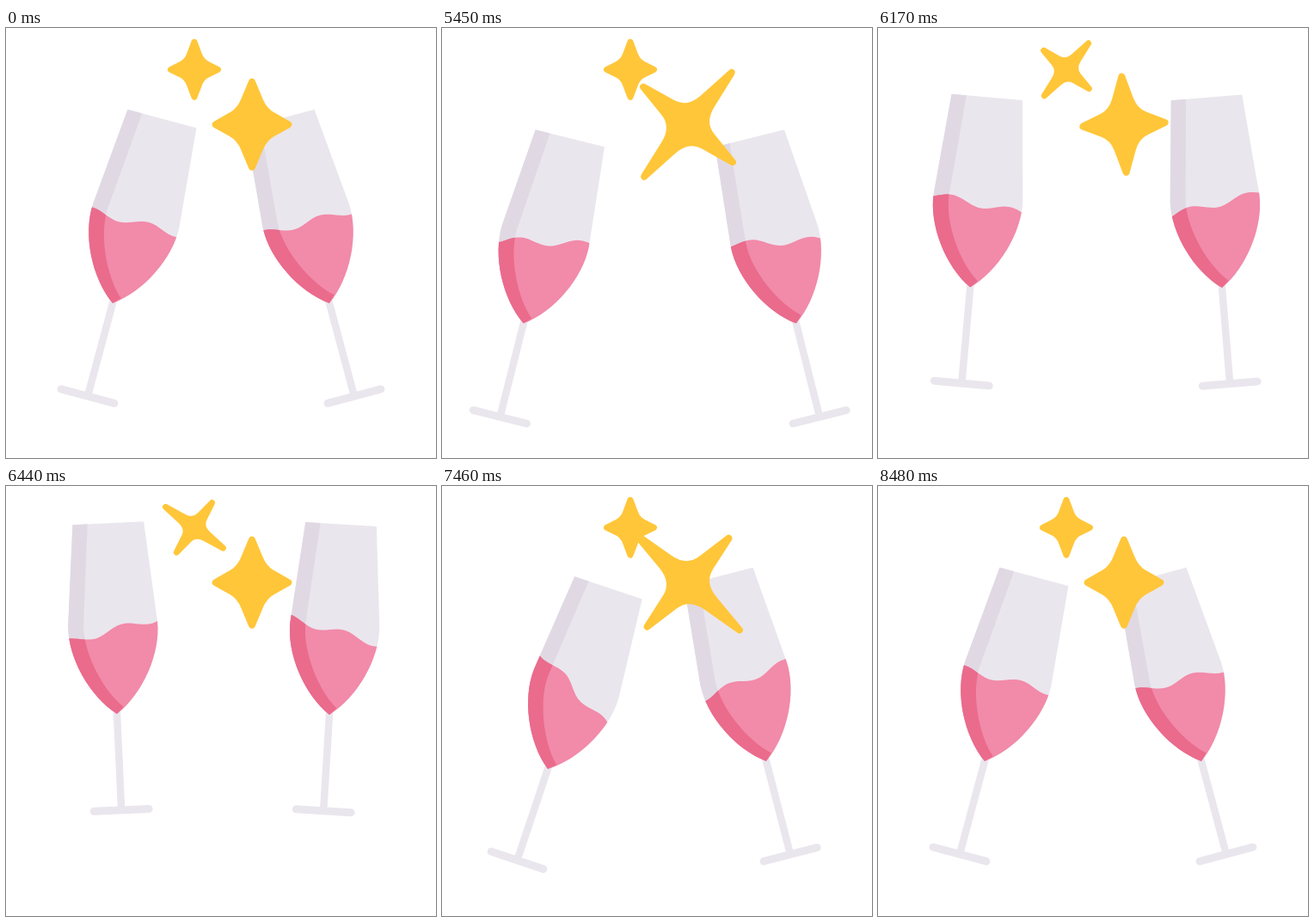
Write an HTML page that moves like this. It is 500 by 500 pixels and loops after 8510 ms.

```html
<!DOCTYPE html>
<html lang="en">
<head>
<meta charset="utf-8">
<title>Cheers</title>
<style>
  html, body { margin: 0; width: 100%; height: 100%; overflow: hidden; background: #fff; }
  svg { display: block; width: 100%; height: 100%; }
</style>
</head>
<body>
<svg viewBox="0 0 500 500">
  <defs>
    <path id="bowl" d="M-41.4-222L-52-105C-54-68-31-22 0 0C31-22 54-68 52-105L41.4-222Z"/>
    <path id="band" d="M-41.4-222L-52-105C-54-68-31-22 0 0L8-8C-14-27-36-72-34-105L-24-222Z"/>
    <clipPath id="inBowl"><use href="#bowl"/></clipPath>
    <clipPath id="inBand"><use href="#band"/></clipPath>
  </defs>
  <g id="glasses"></g>
  <g id="stars" fill="#ffc639" stroke="#ffc639" stroke-linejoin="round"></g>
</svg>
<script>
const LOOP = 8510, START = 5000, END = 8480, STEP = 30;
const WAVE = { length: 68, height: 4.2, crest: 16, cycles: 5, level: -97.5 };

// Rows: time, x, y, angle of the bowl's tip; slosh rows: time, tilt of the liquid.
const GLASSES = [
  {
    pose: [
      [5000, 124, 320, 15], [5820, 77.5, 357.5, 13], [5930, 82, 347, 12.5],
      [6440, 129, 265, -2.65], [6980, 109, 344, 4.2], [7240, 113, 344, 20.5],
      [7460, 123, 329, 18.5], [7660, 124, 320, 15]
    ],
    slosh: [
      [5000, 0], [5400, -12], [5930, 18], [6440, -12.5], [6980, -35],
      [7460, 30], [7800, -8], [8150, 4], [8480, 0]
    ]
  },
  {
    pose: [
      [5000, 376, 320, -15], [5820, 433, 357.5, -13], [5930, 428, 347, -12.5],
      [6440, 376, 266, 3.5], [6980, 388, 347, -12.5], [7060, 388.5, 348, -15.5],
      [7460, 377, 320, -14.5], [7660, 376, 320, -15]
    ],
    slosh: [
      [5000, 0], [5400, 12], [5930, -22], [6440, 13], [6940, 35], [6980, 34],
      [7460, -9], [7560, -12], [7900, 5], [8200, -2], [8480, 0]
    ]
  }
];

const STARS = [
  { x: 219, y: 48.3, tall: 35.5, wide: 31, inner: [8.5, 9.5], line: 7, grow: .29, pinch: .55, starts: [5770] },
  { x: 286, y: 112.2, tall: 53.5, wide: 46.3, inner: [14, 16], line: 8, grow: .72, pinch: .4, starts: [5050, 6760] }
];
const SPIN = 1300;

const fix = n => n.toFixed(2);
const clamp = (v, lo, hi) => Math.min(hi, Math.max(lo, v));

// Smooth curve through keyed values that never overshoots them.
function track(rows, col) {
  const n = rows.length;
  const slope = i => (rows[i + 1][col] - rows[i][col]) / (rows[i + 1][0] - rows[i][0]);
  const tangent = rows.map((_, i) => {
    if (i === 0) return slope(0) / 2;
    if (i === n - 1) return 0;
    const a = slope(i - 1), b = slope(i);
    return a * b > 0 ? 2 * a * b / (a + b) : 0;
  });
  return time => {
    const t = clamp(time, rows[0][0], rows[n - 1][0]);
    let i = 0;
    while (i < n - 2 && t > rows[i + 1][0]) i++;
    const span = rows[i + 1][0] - rows[i][0];
    const p = (t - rows[i][0]) / span, q = 1 - p;
    return rows[i][col] * q * q * (1 + 2 * p) + rows[i + 1][col] * p * p * (3 - 2 * p)
      + span * p * q * (q * tangent[i] - p * tangent[i + 1]);
  };
}

// Cubic bezier timing (.5, 0, .3, 1).
function ease(p) {
  let lo = 0, hi = 1;
  for (let i = 0; i < 24; i++) {
    const s = (lo + hi) / 2, r = 1 - s;
    if (1.5 * r * r * s + .9 * r * s * s + s * s * s < p) lo = s; else hi = s;
  }
  return lo * lo * (3 - 2 * lo);
}

function liquidPath(time) {
  const { length, height, crest, cycles, level } = WAVE;
  const shift = crest - cycles * length * (time - START) / (END - START);
  let d = 'M-110 150';
  for (let x = -110; x <= 110; x += 4) {
    d += `L${x} ${fix(level - height * Math.cos(2 * Math.PI * (x - shift) / length))}`;
  }
  return d + 'L110 150Z';
}

function starPath({ tall, wide, inner, line }, scale, pinch) {
  const round = line / 2;
  const up = tall * scale - round, side = wide * scale - round;
  const tips = [[0, -up], [side, 0], [0, up], [-side, 0]];
  const signs = [[1, -1], [1, 1], [-1, 1], [-1, -1]];
  const toward = (a, b) => a.map((v, i) => fix(v + .65 * (b[i] - v))).join(' ');
  return tips.map((tip, i) => {
    const dip = signs[i].map((s, j) => s * inner[j] * pinch);
    return `${i ? 'L' : 'M'}${tip.map(fix).join(' ')}L${toward(tip, dip)}`
      + `Q${dip.map(fix).join(' ')} ${toward(tips[(i + 1) % 4], dip)}`;
  }).join('') + 'Z';
}

const glassLayer = document.getElementById('glasses');
const starLayer = document.getElementById('stars');

const glassMarkup = `<g class="glass">
  <path d="M0-4V112" stroke="#eae6ed" stroke-width="8.5"/>
  <path d="M-32 112H32" stroke="#eae6ed" stroke-width="9" stroke-linecap="round"/>
  <use href="#bowl" fill="#eae6ed"/>
  <use href="#band" fill="#e0d9e4"/>
  <g clip-path="url(#inBowl)"><path class="liquid" fill="#f28aa9"/></g>
  <g clip-path="url(#inBand)"><path class="liquid" fill="#ea6b8c"/></g>
</g>`;
glassLayer.innerHTML = glassMarkup.repeat(GLASSES.length);
starLayer.innerHTML = STARS.map(s => `<path stroke-width="${s.line}"/>`).join('');

const glasses = GLASSES.map(({ pose, slosh }, i) => {
  const node = glassLayer.children[i];
  return {
    node,
    liquids: node.querySelectorAll('.liquid'),
    x: track(pose, 1), y: track(pose, 2), angle: track(pose, 3), tilt: track(slosh, 1)
  };
});

function draw(time) {
  const surface = liquidPath(time);
  for (const g of glasses) {
    g.node.setAttribute('transform',
      `translate(${fix(g.x(time))} ${fix(g.y(time))}) rotate(${fix(g.angle(time))})`);
    for (const liquid of g.liquids) {
      liquid.setAttribute('d', surface);
      liquid.setAttribute('transform', `rotate(${fix(g.tilt(time))} 0 ${WAVE.level})`);
    }
  }
  STARS.forEach((star, i) => {
    const begin = star.starts.filter(s => s <= time).pop() ?? Infinity;
    const turn = ease(clamp((time - begin) / SPIN, 0, 1));
    const burst = Math.pow(Math.max(0, Math.sin(Math.PI * turn)), .6);
    const node = starLayer.children[i];
    node.setAttribute('d', starPath(star, 1 + star.grow * burst, 1 - star.pinch * burst));
    node.setAttribute('transform', `translate(${star.x} ${star.y}) rotate(${fix(180 * turn)})`);
  });
}

const origin = performance.now();
function frame() {
  const t = (performance.now() - origin) % LOOP;
  draw(START + Math.max(0, Math.floor((t - START) / STEP)) * STEP);
  requestAnimationFrame(frame);
}
frame();
</script>
</body>
</html>
```
